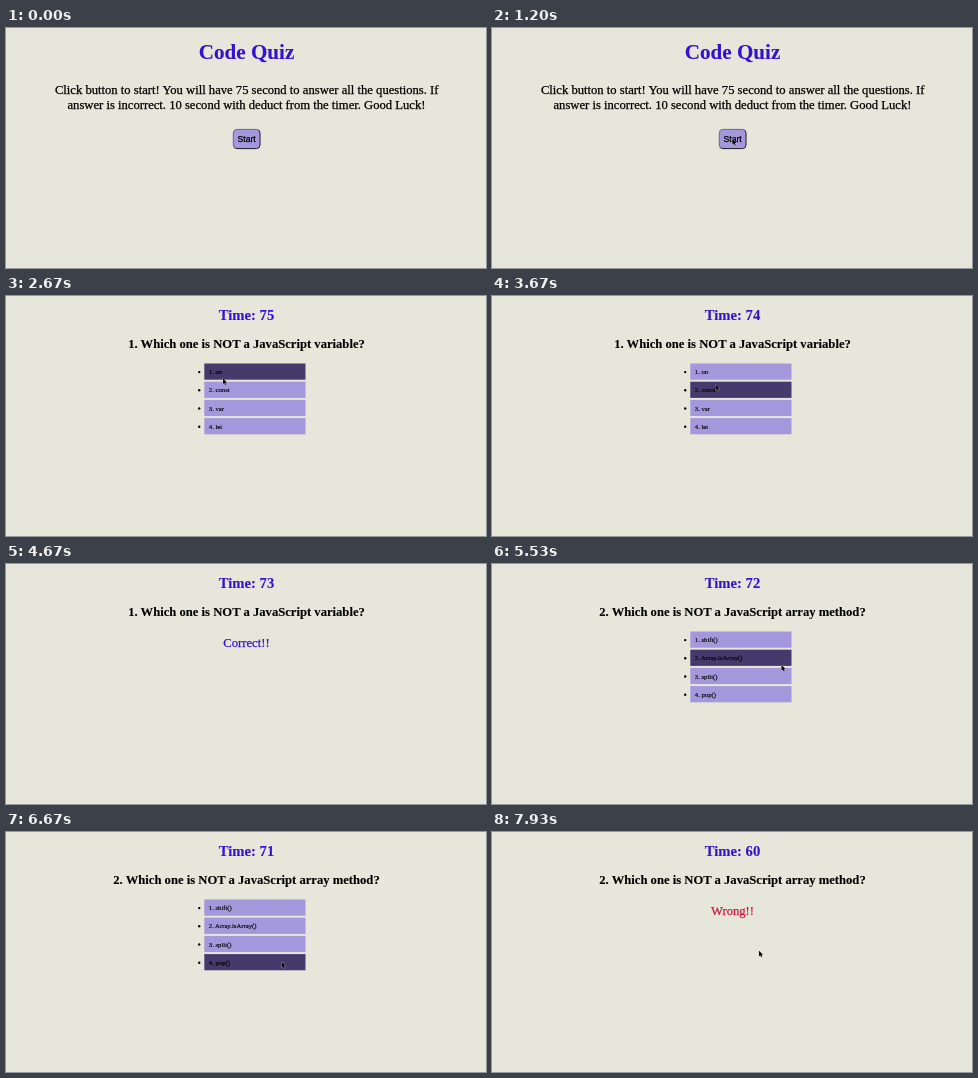
Animation of 480x240 px, one loop 8 s. Source, as an HTML page:

```html
<!DOCTYPE html>
<html lang="en">
<head>
<meta charset="utf-8">
<title>Code Quiz</title>
<style>
html, body { margin: 0; height: 100%; overflow: hidden; background: #e6e6da; }
svg { display: block; width: 100vw; height: 100vh; }
text {
  font: 12.64px "Liberation Serif", serif; text-anchor: middle;
  fill: currentColor; stroke: currentColor; stroke-width: .25px;
}
.blue { color: #3412d0; }
.bold { font-weight: bold; stroke-width: .12px; }
.title { font-size: 21.1px; }
.time { font-size: 14.65px; }
.item { font-size: 6.7px; text-anchor: start; stroke-width: .15px; }
.button { font: 8.6px "Liberation Sans", sans-serif; }
</style>
</head>
<body>
<svg viewBox="0 0 480 240">
  <linearGradient id="edge" x2="1" y2="1">
    <stop offset=".45" stop-color="#6c6688"/>
    <stop offset=".55" stop-color="#1c1a26"/>
  </linearGradient>
  <g id="intro">
    <text class="blue bold title" x="240.5" y="31">Code Quiz</text>
    <text x="240.7" y="66.2">Click button to start! You will have 75 second to answer all the questions. If</text>
    <text x="240.5" y="80.8">answer is incorrect. 10 second with deduct from the timer. Good Luck!</text>
    <rect x="227.3" y="101.4" width="26.7" height="19.2" rx="3.6" fill="#a498dc" stroke="url(#edge)"/>
    <text class="button" x="240.7" y="114">Start</text>
  </g>
  <g id="quiz">
    <text id="time" class="blue bold time" x="240.5" y="24"></text>
    <text id="question" class="bold" x="240.5" y="51.8"></text>
    <g id="list"></g>
    <text id="verdict" x="240.5" y="83.1"></text>
  </g>
  <path id="cursor" d="M0 0V5.6L1.3 4.5L2.2 6.5L3.2 6.1L2.3 4.1H4Z" stroke="#ddd" stroke-width=".5" paint-order="stroke"/>
</svg>
<script>
const LOOP = 8000, FPS = 15;
const el = id => document.getElementById(id);
const show = (node, on) => node.style.display = on ? "" : "none";

const rounds = [
  { from: 2130, answered: 4270, text: "1. Which one is NOT a JavaScript variable?",
    choices: ["on", "const", "var", "let"], verdict: "Correct!!", color: "#3412d0" },
  { from: 5270, answered: 7000, text: "2. Which one is NOT a JavaScript array method?",
    choices: ["shift()", "Array.isArray()", "split()", "pop()"], verdict: "Wrong!!", color: "#d4143c" }
];

// Pointer moves: start, end, x, y
const entry = { x: 222, y: 114 };
const moves = [
  [270, 730, 240.5, 111],
  [1400, 1670, 253, 35],
  [1940, 2670, 217, 82.5],
  [2670, 3270, 217, 111],
  [3270, 3930, 227, 77],
  [4670, 4930, 243, 95],
  [5130, 5530, 289.5, 101],
  [5930, 6670, 275.7, 130],
  [7600, 7930, 267, 118.7]
];

function pointer(t) {
  let { x, y } = entry;
  for (const [start, end, toX, toY] of moves) {
    const p = Math.min(1, Math.max(0, (t - start) / (end - start)));
    const ease = p * p * (3 - 2 * p);
    x += (toX - x) * ease;
    y += (toY - y) * ease;
  }
  return { x, y };
}

const ROW = 16.2, rowTop = i => 67.5 + i * 18.2;
el("list").innerHTML = rounds[0].choices.map((_, i) => {
  const y = rowTop(i);
  return `<circle cx="193.2" cy="${y + 8.6}" r="1.2"/>
    <rect x="198.3" y="${y}" width="101.2" height="${ROW}"/>
    <text class="item" x="202.8" y="${y + 10.6}"></text>`;
}).join("");
const bars = el("list").querySelectorAll("rect");
const labels = el("list").querySelectorAll("text");

function draw(t) {
  const { x, y } = pointer(t);
  const round = rounds.findLast(r => t >= r.from);
  const done = round && t >= round.answered;
  const overVerdict = done && y < 84;
  show(el("cursor"), t >= moves[0][0] && !overVerdict);
  el("cursor").setAttribute("transform", `translate(${x} ${y})`);

  show(el("intro"), !round);
  show(el("quiz"), round);
  if (!round) return;

  const penalty = t >= rounds[1].answered ? 10 : 0;
  el("time").textContent = "Time: " + (75 - Math.floor((t - rounds[0].from) / 1000) - penalty);
  el("question").textContent = round.text;
  el("verdict").textContent = done ? round.verdict : "";
  el("verdict").style.color = round.color;
  show(el("list"), !done);
  round.choices.forEach((choice, i) => {
    const over = x > 198 && x < 300 && y >= rowTop(i) && y < rowTop(i) + ROW;
    bars[i].style.fill = over ? "#443a6c" : "#a498dc";
    labels[i].textContent = `${i + 1}. ${choice}`;
  });
}

function tick() {
  const frame = Math.floor(performance.now() % LOOP * FPS / 1000 + 0.1);
  draw(frame * 1000 / FPS + 5);
  requestAnimationFrame(tick);
}
tick();
</script>
</body>
</html>
```
